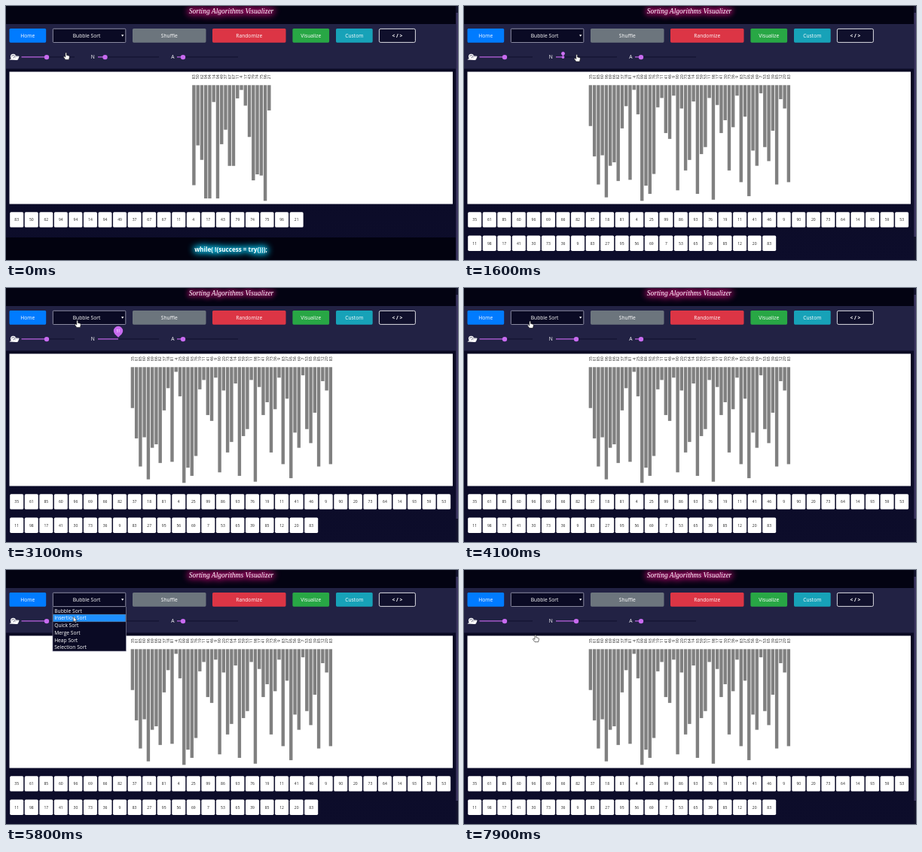
Write an HTML page that moves like this. It is 600x338 px and loops after 8 s.

```html
<!DOCTYPE html>
<html lang="en">
<head>
<meta charset="utf-8">
<title>Sorting visualizer</title>
<style>
  html, body { margin: 0; width: 100%; height: 100%; overflow: hidden; background: #0b0b28; }
  svg { display: block; width: 100vw; height: 100vh; }
  text { font-family: "Open Sans", "Noto Sans", sans-serif; font-size: 6.7px; fill: #fff; }
  .mid { text-anchor: middle; }
  .chip { font-size: 5px; fill: #222; }
  .title { font: italic 9.5px "Liberation Serif", "Noto Serif", serif; }
  .code { font-size: 8.15px; font-weight: 700; }
  .glow { stroke-width: 4; stroke-linejoin: round; }
</style>
</head>
<body>
<svg id="stage" viewBox="0 0 600 338" preserveAspectRatio="none"></svg>
<script>
const LOOP = 8000, STEP = 100;
const SMALL = [83, 50, 62, 94, 94, 14, 94, 49, 37, 67, 67, 11, 4, 17, 43, 79, 74, 75, 96, 21];
const LARGE = [35, 61, 85, 60, 96, 69, 66, 82, 37, 18, 81, 4, 25, 99, 86, 93, 76, 19, 11, 41,
  46, 9, 90, 20, 73, 64, 14, 93, 59, 53, 11, 98, 17, 41, 30, 73, 36, 9, 83, 27, 95, 56, 69, 7,
  53, 65, 39, 85, 12, 20, 83];
const ALGORITHMS = ["Bubble", "Insertion", "Quick", "Merge", "Heap", "Selection"];
const LIST_TOP = 49.3, ROW = 9.75;
const stage = document.getElementById("stage");

function add(parent, tag, attrs = {}, text) {
  const el = document.createElementNS("http://www.w3.org/2000/svg", tag);
  set(el, attrs);
  if (text !== undefined) el.textContent = text;
  parent.appendChild(el);
  return el;
}
function set(el, attrs) {
  for (const key in attrs) el.setAttribute(key, attrs[key]);
}
const rect = (parent, x, y, width, height, fill, more = {}) =>
  add(parent, "rect", { x, y, width, height, fill, ...more });
const label = (parent, x, y, text, cls = "mid", more = {}) =>
  add(parent, "text", { x, y, class: cls, ...more }, text);
const show = (el, on) => el.setAttribute("visibility", on ? "visible" : "hidden");
const clamp = v => Math.max(0, Math.min(1, v));
const ramp = (t, from, to) => clamp((t - from) / (to - from));
const smooth = p => p * p * (3 - 2 * p);

// Page bands
const defs = add(stage, "defs");
const shade = add(defs, "linearGradient", { id: "shade", x1: 0, y1: 0, x2: 0, y2: 1 });
add(shade, "stop", { offset: 0, "stop-color": "#070720" });
add(shade, "stop", { offset: 1, "stop-color": "#0d0d2b" });
rect(stage, 0, 0, 600, 338, "url(#shade)");
rect(stage, 0, 0, 600, 24, "#030312");

function glowingText(parent, x, y, text, cls, color) {
  const halo = label(parent, x, y, text, `mid glow ${cls}`, { stroke: color });
  halo.style.fill = color;
  label(parent, x, y, text, `mid ${cls}`);
  return halo;
}
const titleGlow = glowingText(stage, 299, 9.5, "Sorting Algorithms Visualizer", "title", "#b0086a");
rect(stage, 0, 24, 600, 59.5, "#222244");
rect(stage, 4.5, 87.5, 588.5, 176, "#fff");

// Toolbar
function button(x, width, fill, text) {
  rect(stage, x, 30, width, 18.7, fill, { rx: 1.6 });
  label(stage, x + width / 2, 42, text);
}
button(4.5, 48.7, "#007bff", "Home");
button(168, 97.5, "#6c757d", "Shuffle");
button(274, 97.5, "#dc3545", "Randomize");
button(380.4, 48.7, "#28a745", "Visualize");
button(438, 48.7, "#17a2b8", "Custom");
rect(stage, 495.4, 30.4, 48, 18, "#10102c", { rx: 1.8, stroke: "#f4f4f8", "stroke-width": 0.9 });
label(stage, 519.5, 42, "< / >").style.fontWeight = 700;
rect(stage, 62.3, 30.3, 96.5, 18.2, "#0a0a24", { rx: 1, stroke: "#a9a9bd", "stroke-width": 0.8 });
label(stage, 107, 42, "Bubble Sort");
add(stage, "path", { d: "M153 38.2h3.4l-1.7 2.6z", fill: "#fff" });

// Sliders
const PURPLE = "#c86bf0";
function slider(x, end, value) {
  rect(stage, x, 67.3, end - x, 1.2, "#121230");
  const fill = rect(stage, x, 67.3, value - x, 1.2, PURPLE);
  const thumb = add(stage, "circle", { cx: value, cy: 68.1, r: 3.2, fill: PURPLE });
  return { x, fill, thumb };
}
const snail = add(stage, "g", { fill: "#fff" });
add(snail, "circle", { cx: 9.5, cy: 67.3, r: 3.5 });
add(snail, "path", { d: "M4.5 71.5q2-2 5-2.2h3.2l1.3-3.4 1.1.3v1.5l1.6-1.4.8 1-1.2 3.1q-.5 1.5-2.3 1.5z" });
add(snail, "path", { d: "M7.7 67.4a1.8 1.8 0 1 1 2 1.6", fill: "none", stroke: "#222244", "stroke-width": 0.6 });
slider(20.5, 91, 54);
label(stage, 115.2, 70.4, "N");
label(stage, 221.3, 70.4, "A");
const count = slider(122, 203, 131.5);
slider(227, 308, 235);
const pin = add(stage, "g");
add(pin, "path", { d: "M-4.4 4.4A6.2 6.2 0 1 1 4.4 4.4L0 8.8z", fill: PURPLE });
label(pin, 0, 1.7, "51").style.fontSize = "4.6px";

// Bars and number chips for one array
function dataset(values) {
  const group = add(stage, "g");
  const pitch = 5.26, left = 299.4 - values.length * pitch / 2;
  const unit = 154 / Math.max(...values);
  values.forEach((value, i) => {
    const x = left + i * pitch;
    rect(group, x + 0.4, 105.3, 4.4, value * unit, "#808080");
    const tag = label(group, 0, 0, value, "mid chip", { transform: `translate(${x + 4.4} 94.3) rotate(-90)` });
    tag.style.fontSize = "5.2px";
    const cx = 14.2 + (i % 30) * 19.55, top = 274.3 + Math.floor(i / 30) * 31.3;
    rect(group, cx - 9, top, 18, 20.3, "#fff", { rx: 1.6 });
    label(group, cx, top + 12, value, "mid chip");
  });
  return group;
}
const small = dataset(SMALL);
rect(small, 0, 308, 600, 30, "#02020f");
const codeGlow = glowingText(small, 298.5, 326.8, "while( !(success = try()));", "code", "#0ff");
const large = dataset(LARGE);

// Page scrollbar
rect(stage, 597, 0, 3, 338, "#12122c");
const scroll = rect(stage, 597.4, 9, 2.6, 300, "#3b3560");

// Dropdown
const list = add(stage, "g");
const panel = rect(list, 62, LIST_TOP - 0.5, 97.3, 59.2, "#0a0a24", { "stroke-width": 0.6 });
const items = add(list, "g");
const marker = rect(items, 62.5, 0, 96.3, ROW, "#1e90ff", { stroke: "#d8a060", "stroke-width": 0.5, "stroke-dasharray": "1 1" });
ALGORITHMS.forEach((name, i) => label(items, 64.2, LIST_TOP + i * ROW + 7.2, `${name} Sort`, ""));

// Cursors, both anchored at the tip
const ink = { fill: "#fff", stroke: "#111", "stroke-width": 0.6, "stroke-linejoin": "round" };
const hand = add(stage, "path", { ...ink,
  d: "M-.9 .8Q0-.6.9.8V3.4L3.9 4.2Q4.8 4.6 4.6 6L3.8 9.4H-.8L-3.2 6.2Q-3.5 5-2.3 5L-.9 6.1z" });
const arrow = add(stage, "path", { ...ink, d: "M0 0V7.3L1.7 5.8 2.9 8.5 4.1 8 2.9 5.4H5.2z" });

const PATH = [
  { at: 0, x: 79.7, y: 62 }, { at: 100, x: 79.7, y: 62 },
  { at: 800, x: 149.7, y: 64.5 }, { at: 2700, x: 149.7, y: 64.5 },
  { at: 3100, x: 94.7, y: 43 }, { at: 3700, x: 94.7, y: 43 },
  { at: 4300, x: 85.2, y: 44.3 }, { at: 5400, x: 85.2, y: 44.3 },
  { at: 6300, x: 94.8, y: 86.3 }, { at: LOOP, x: 94.8, y: 86.3 }
];
function cursorAt(t) {
  const i = PATH.findIndex(p => p.at > t), a = PATH[i - 1], b = PATH[i];
  const p = smooth(ramp(t, a.at, b.at));
  return { x: a.x + (b.x - a.x) * p, y: a.y + (b.y - a.y) * p };
}

function draw(t) {
  const grown = t >= 1500;
  show(small, !grown);
  show(large, grown);
  scroll.setAttribute("height", grown ? 298 : 329);

  // The halos breathe between a tight and a wide blur
  const pulse = 0.5 + 0.5 * Math.cos(t * Math.PI / 1000);
  titleGlow.style.filter = `blur(${3 + pulse * 1.5}px)`;
  titleGlow.style.opacity = 0.7 + 0.25 * pulse;
  const hue = `hsl(${165 + 25 * pulse} ${45 + 55 * pulse}% ${45 + 5 * pulse}%)`;
  codeGlow.style.fill = codeGlow.style.stroke = hue;
  codeGlow.style.filter = `blur(${2 + pulse * 2.5}px)`;
  codeGlow.style.opacity = 0.6 + 0.3 * pulse;

  const x = t < 1700 ? 131.5 : 149;
  const size = ramp(t, 1480, 1780) * (1 - ramp(t, 3150, 3350));
  count.fill.setAttribute("width", x - count.x);
  set(count.thumb, { cx: x, r: 3.2 * (1 - size) });
  set(pin, { transform: `translate(${x} ${67.5 - 10.5 * size}) scale(${size})` });

  const open = t >= 5100 && t < 7600, filled = open && t >= 5200;
  const { x: cx, y: cy } = cursorAt(t);
  show(list, open);
  show(items, filled);
  set(panel, { fill: filled ? "#0a0a24" : "#fff", stroke: filled ? "#8c8ca4" : "#fff" });
  const row = Math.max(0, Math.min(5, Math.floor((cy - LIST_TOP) / ROW)));
  marker.setAttribute("y", LIST_TOP + row * ROW);

  const pointing = filled && cy > LIST_TOP;
  show(hand, !pointing);
  show(arrow, pointing);
  set(pointing ? arrow : hand, { transform: `translate(${cx} ${cy})` });
}

const start = performance.now();
function tick(now) {
  const t = Math.max(0, now - start) % LOOP;
  draw(Math.floor(t / STEP) * STEP);
  requestAnimationFrame(tick);
}
draw(0);
requestAnimationFrame(tick);
</script>
</body>
</html>
```
